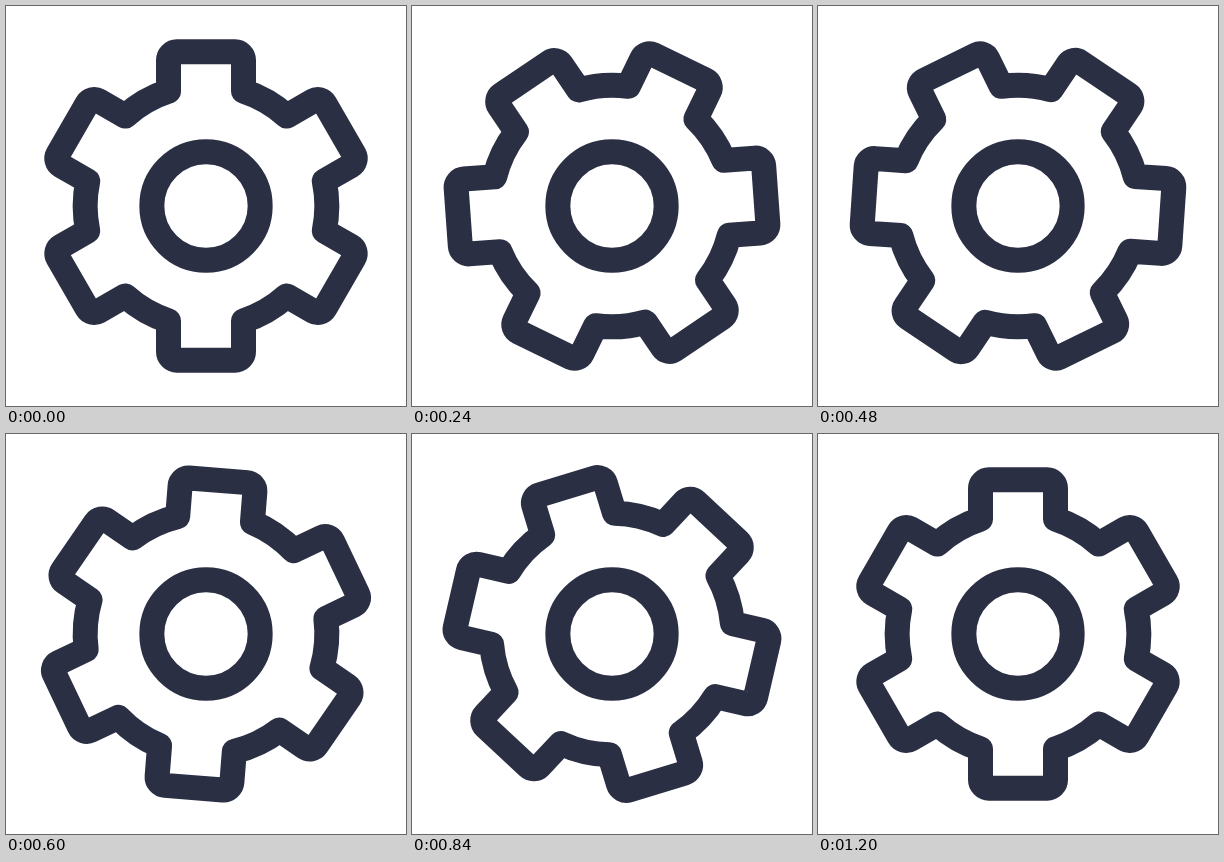
Write an HTML page that moves like this. It is 400 by 400 pixels and loops after 3.23 s.

```html
<!DOCTYPE html>
<html lang="en">
<head>
<meta charset="utf-8">
<title>Settings gear</title>
<style>
  html, body { margin: 0; width: 100%; height: 100%; overflow: hidden; background: #fff; }
  svg { display: block; width: 100%; height: 100%; }
</style>
</head>
<body>
<svg viewBox="-12 -12 24 24">
  <g fill="none" stroke="#2b2f44" stroke-width="1.5" stroke-linejoin="round">
    <path id="gear"/>
    <circle r="3.25"/>
  </g>
</svg>
<script>
const LOOP = 3230, SPIN = 1200, STEP = 30, TURN = 180;
const TEETH = 6, RING = 7.25, HALF = 2.25, TIP = 9.25, ROUND = 0.5;
const gear = document.getElementById('gear');

function gearPath() {
  const foot = Math.sqrt(RING * RING - HALF * HALF);
  let d = '';
  for (let i = 0; i < TEETH; i++) {
    const a = i * 2 * Math.PI / TEETH, c = Math.cos(a), s = Math.sin(a);
    const at = (x, y) => `${(x * c - y * s).toFixed(4)} ${(x * s + y * c).toFixed(4)}`;
    const arc = (r, x, y) => `A${r} ${r} 0 0 1 ${at(x, y)}`;
    d += i ? arc(RING, -HALF, -foot) : 'M' + at(-HALF, -foot);
    d += 'L' + at(-HALF, ROUND - TIP) + arc(ROUND, ROUND - HALF, -TIP);
    d += 'L' + at(HALF - ROUND, -TIP) + arc(ROUND, HALF, ROUND - TIP);
    d += 'L' + at(HALF, -foot);
  }
  return d + `A${RING} ${RING} 0 0 1 ${-HALF} ${-foot}Z`;
}

// Cubic bezier easing (0.333, 0, 0.37, 1), solved by bisection
function ease(x) {
  if (x <= 0 || x >= 1) return x <= 0 ? 0 : 1;
  let lo = 0, hi = 1, s = 0.5;
  for (let i = 0; i < 30; i++) {
    s = (lo + hi) / 2;
    const u = 1 - s;
    const bx = 3 * s * u * u * 0.333 + 3 * s * s * u * 0.37 + s * s * s;
    if (bx < x) lo = s; else hi = s;
  }
  return s * s * (3 - 2 * s);
}

function draw(ms) {
  const t = Math.floor((ms % LOOP) / STEP) * STEP;
  gear.setAttribute('transform', `rotate(${TURN * ease(t / SPIN)})`);
}

gear.setAttribute('d', gearPath());
draw(0);
let start;
function tick(now) {
  if (start === undefined) start = now;
  draw(now - start);
  requestAnimationFrame(tick);
}
requestAnimationFrame(tick);
</script>
</body>
</html>
```
